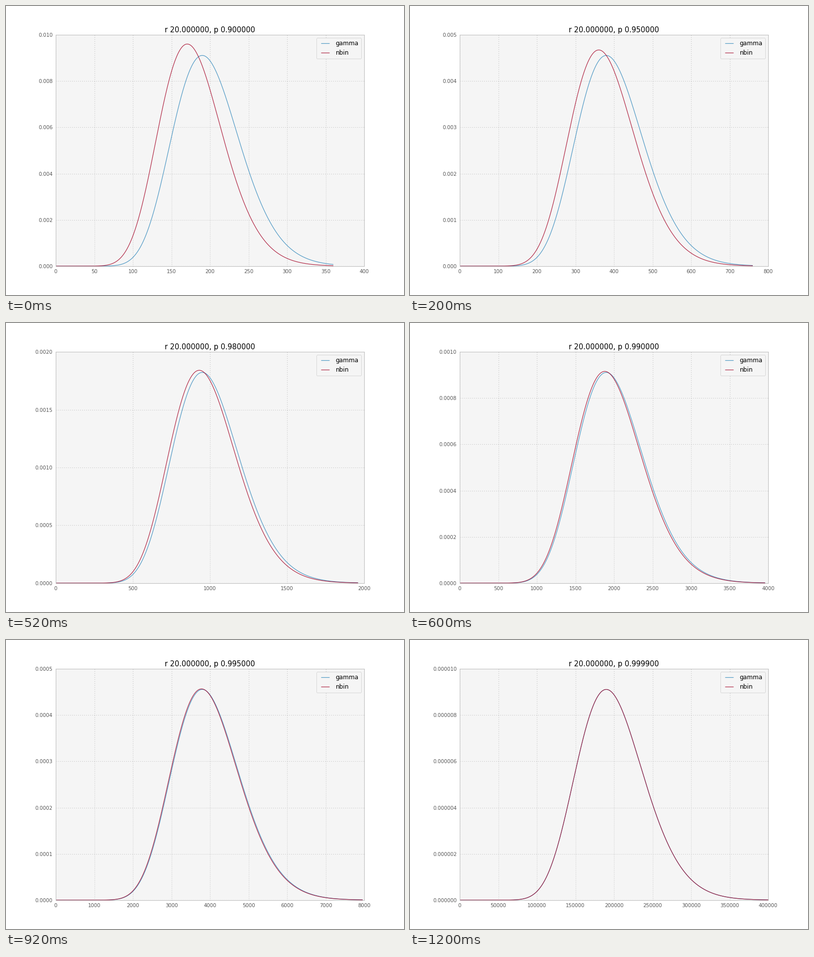
Write a matplotlib script that moves like this. It is 800 px wide and 582 px high and loops after 1400 ms.

```python
import math

import matplotlib.pyplot as plt
import numpy as np
from matplotlib.animation import FuncAnimation

DPI = 80
PT = 800 / 11 / DPI  # point size on an 11-inch-wide sheet
R = 20
P_VALUES = (0.9, 0.95, 0.98, 0.99, 0.995, 0.999, 0.9999)
BLUE, RED = "#348ABD", "#A60628"
PANEL, EDGE, TEXT = "#f5f5f5", "#bcbcbc", "#555555"

plt.rcParams.update({
    "font.family": "DejaVu Sans",
    "text.hinting": "force_autohint",
    "lines.scale_dashes": False,
    "lines.solid_capstyle": "butt",
    "lines.dash_capstyle": "butt",
    "patch.linewidth": 0.5 * PT,
    "savefig.dpi": "figure",
})


def gamma_pdf(x, p):
    rate = 1 - p
    return rate * (rate * x) ** (R - 1) * np.exp(-rate * x) / math.factorial(R - 1)


def nbin_pmf(k, p):
    ways = np.ones_like(k)
    for i in range(1, R):
        ways *= (k + i) * (1 - p) / i
    return ways * (1 - p) * p ** k


def nice_step(top):
    """Smallest 1-2-5 step that covers top in at most nine intervals."""
    raw = top / 9
    base = 10.0 ** math.floor(math.log10(raw))
    return next(m * base for m in (1, 2, 5, 10) if m * base >= raw)


def round_axis(axis, set_limits, top):
    step = nice_step(top)
    count = math.ceil(top / step - 1e-9)
    decimals = max(0, -math.floor(math.log10(step) + 1e-9))
    ticks = [i * step for i in range(count + 1)]
    axis.set_ticks(ticks, labels=[f"{t:.{decimals}f}" for t in ticks])
    set_limits(0, count * step)


fig = plt.figure(figsize=(800 / DPI, 582 / DPI), dpi=DPI, facecolor="white")
ax = fig.add_axes([0.125, 0.1, 0.775, 0.8], facecolor=PANEL)
ax.set_axisbelow(True)
ax.grid(color="#b2b2b2", linewidth=0.5 * PT * 2, linestyle=(0, (PT, 3 * PT)))
ax.tick_params(length=0, pad=6 * PT, labelsize=10 * PT, labelcolor=TEXT)
for spine in ax.spines.values():
    spine.set(color=EDGE, linewidth=PT)

gamma_line, = ax.plot([], [], color=BLUE, lw=1.2 * PT, alpha=0.85, label="gamma")
nbin_line, = ax.plot([], [], color=RED, lw=1.2 * PT, alpha=0.85, label="nbin")
title = ax.set_title("", fontsize=14.4 * PT, pad=5 * PT)
ax.legend(loc="upper right", fontsize=12 * PT, numpoints=2, fancybox=True,
          framealpha=1, facecolor=PANEL, edgecolor=EDGE)


def update(frame):
    p = P_VALUES[frame]
    x = np.linspace(0, 2 * R * p / (1 - p), 800)
    gamma, nbin = gamma_pdf(x, p), nbin_pmf(x, p)
    gamma_line.set_data(x, gamma)
    nbin_line.set_data(x, nbin)
    title.set_text(f"r {R:f}, p {p:f}")
    round_axis(ax.xaxis, ax.set_xlim, x[-1])
    round_axis(ax.yaxis, ax.set_ylim, max(gamma.max(), nbin.max()))
    return gamma_line, nbin_line, title


anim = FuncAnimation(fig, update, frames=len(P_VALUES), interval=200,
                     repeat=True, repeat_delay=0, blit=False)
plt.show()
```
